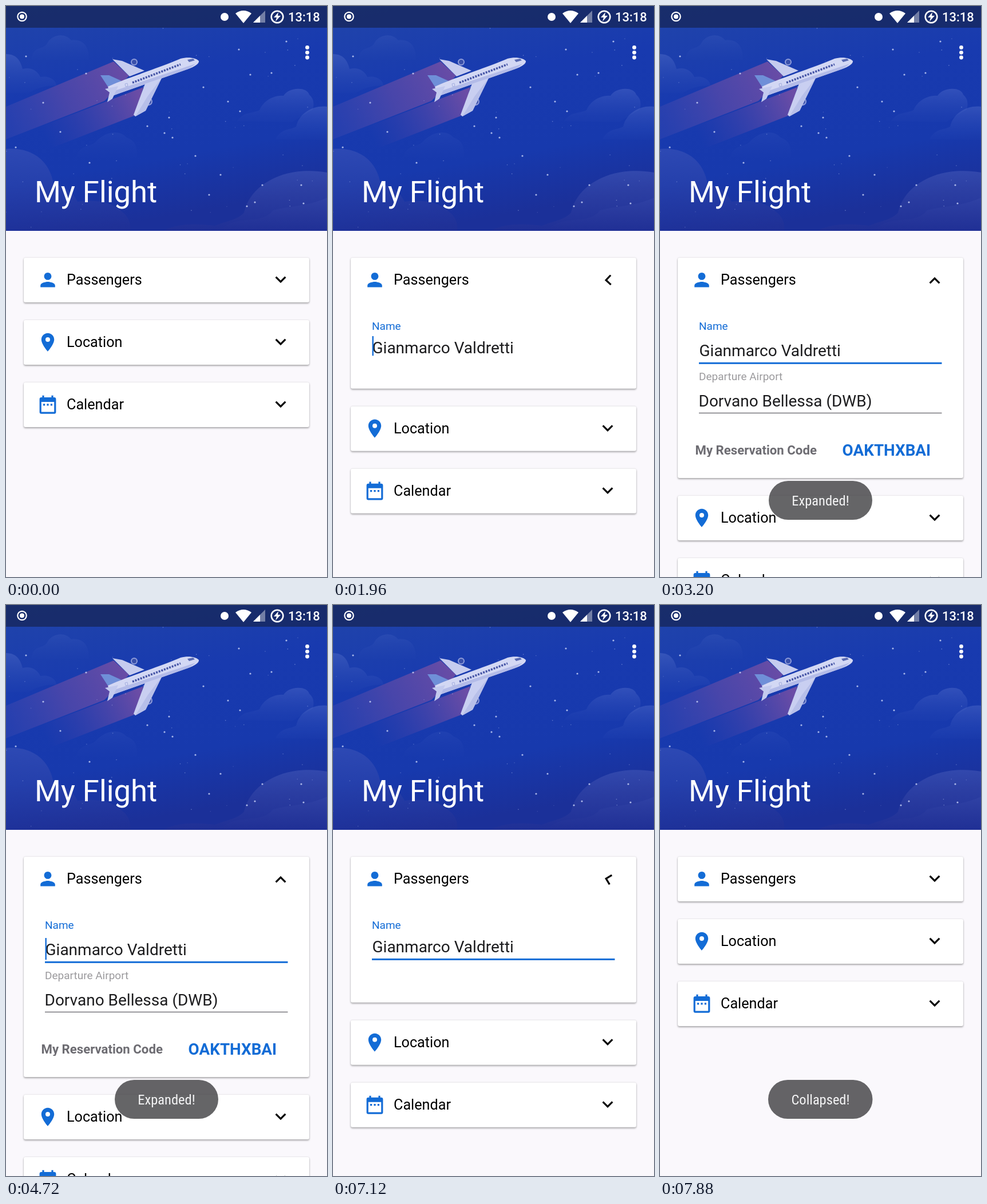
An HTML page that plays this animation: 561 px wide and 998 px high, repeating every 9.36 s.

```html
<!DOCTYPE html>
<html lang="en">
<head>
<meta charset="utf-8">
<title>My Flight</title>
<style>
  html, body { margin: 0; height: 100%; overflow: hidden; background: #faf8fc; }
  svg { display: block; width: 561px; height: 998px; font-family: Roboto, sans-serif; }
  .card { fill: #fff; filter: drop-shadow(0 2px 1.5px rgba(0,0,0,.27)) drop-shadow(0 0 1px rgba(0,0,0,.16)); }
  .head { font-size: 25.2px; }
  .label { font-size: 19px; }
  .value { font-size: 28px; fill: #1c1c1e; }
  .blue { fill: #136cd6; }
  #toast text { font-size: 24.5px; font-stretch: condensed; font-family: "Roboto Condensed", Roboto, sans-serif; }
</style>
</head>
<body>
<svg viewBox="0 0 561 998">
  <defs>
    <linearGradient id="sky" x2=".25" y2="1">
      <stop stop-color="#2145aa"/><stop offset=".4" stop-color="#183aaf"/>
      <stop offset=".75" stop-color="#1739ad"/><stop offset="1" stop-color="#1b3099"/>
    </linearGradient>
    <linearGradient id="trail" gradientUnits="userSpaceOnUse" x1="215" y1="125" x2="0" y2="215">
      <stop stop-color="#a3599f" stop-opacity=".58"/><stop offset=".5" stop-color="#8053a4" stop-opacity=".46"/>
      <stop offset="1" stop-color="#5b55b0" stop-opacity=".2"/>
    </linearGradient>
    <linearGradient id="trailEnd" gradientUnits="userSpaceOnUse" x1="240" y1="170" x2="75" y2="245">
      <stop stop-color="#a3599f" stop-opacity=".6"/><stop offset="1" stop-color="#5b4aa8" stop-opacity="0"/>
    </linearGradient>
    <linearGradient id="cloud" x2="0" y2="1">
      <stop stop-color="#6f86d8" stop-opacity=".3"/><stop offset="1" stop-color="#4560c0" stop-opacity=".04"/>
    </linearGradient>
    <linearGradient id="bigCloud" x2="0" y2="1">
      <stop stop-color="#5062bd" stop-opacity=".45"/><stop offset="1" stop-color="#252f91" stop-opacity=".4"/>
    </linearGradient>
    <clipPath id="top"><rect width="561" height="393"/></clipPath>
    <clipPath id="body"><rect id="bodyClip" x="31" y="519" width="499"/></clipPath>
  </defs>
  <rect width="561" height="998" fill="#faf8fc"/>

  <g clip-path="url(#top)">
    <rect width="561" height="393" fill="url(#sky)"/>
    <g fill="url(#cloud)">
      <path d="M0 84C20 84 26 98 29 110C46 106 56 115 60 124C76 121 88 130 88 139Q60 139 40 152H0Z"/>
      <path opacity=".45" d="M45 91C48 70 62 77 71 67C80 48 104 47 114 60C136 57 145 72 145 94H45Z"/>
      <path opacity=".3" d="M123 264C128 242 147 247 156 238C176 217 199 217 211 230C230 236 230 254 229 266Z"/>
      <path d="M404 201C415 184 432 188 443 182C453 160 475 156 485 157C493 142 526 140 530 155Q541 164 536 181L500 203Z"/>
      <path d="M471 233C481 213 497 217 507 211C512 188 536 173 561 176V234Z"/>
    </g>
    <g fill="url(#bigCloud)">
      <path opacity=".85" d="M0 250C48 246 77 273 83 311C103 316 117 325 125 342C154 338 184 342 202 359Q219 371 217 393H0Z"/>
      <path d="M275 393C301 379 334 380 365 384C388 375 406 373 416 361C427 311 489 278 561 291V393Z"/>
      <path opacity=".35" d="M372 393C407 361 443 386 467 357C495 349 526 351 561 335V393Z"/>
    </g>
    <path d="M188 97L0 176V233L172 166L215 122Z" fill="url(#trail)"/>
    <path d="M240 142L42 218L75 250L226 191Z" fill="url(#trailEnd)"/>
    <g id="stars" fill="#d9e2ff"></g>

    <g id="plane">
      <g fill="#3a50aa" stroke="#8f9cda" stroke-width="2">
        <circle cx="224" cy="98" r="5"/><circle cx="249" cy="167" r="6"/>
      </g>
      <path d="M186 93L203 96L242 113L216 123Z" fill="#c6ccef"/>
      <path d="M165 121L180 121L202 131L178 141Z" fill="#6f8fd8"/>
      <path d="M178 141C204 128 271 107 305 92C319 88 333 91 337 96C338 102 326 108 313 112L197 153L186 157L181 151Z" fill="#d3d8f4"/>
      <path d="M181 151L331 101C326 106 320 109 313 112L197 153L186 157Z" fill="#b3bbe8"/>
      <path d="M173 145L196 140L186 162L177 168L181 151Z" fill="#c3caee"/>
      <path d="M243 136L272 126L244 183L226 193L223 190Z" fill="#c9cff1"/>
      <path d="M272 126L244 183L226 193L248 157Z" fill="#b7bfe9"/>
      <path d="M221 134L305 102" fill="none" stroke="#4655a6" stroke-width="3.6" stroke-dasharray="3 1.9"/>
      <path d="M317 94L327 92L330 95L320 98Z" fill="#5869b2"/>
      <path d="M208 136l4-1 1 5-4 1Z" fill="none" stroke="#a5afe0"/>
    </g>
    <rect width="561" height="38" fill="#15224f" opacity=".68"/>
  </g>

  <g fill="#fff">
    <circle cx="28" cy="18.5" r="7.7" fill="none" stroke="#fff" stroke-width="2.2"/>
    <circle cx="28" cy="18.5" r="4"/>
    <circle cx="382" cy="19" r="7"/>
    <path d="M401 13Q415 3 429 13L415 30Z"/>
    <path d="M453 8V29H432Z" opacity=".4"/><path d="M444 17V29H432Z"/>
    <circle cx="474" cy="19" r="10.3" fill="none" stroke="#fff" stroke-width="2.6"/>
    <path d="M476 11L468 20H473L471 27L480 17H475Z"/>
    <text x="493" y="27" font-size="22" font-weight="500">13:18</text>
    <circle cx="526.5" cy="72.5" r="3.4"/><circle cx="526.5" cy="81.3" r="3.4"/><circle cx="526.5" cy="90" r="3.4"/>
    <text x="50" y="343" font-size="52.6">My Flight</text>
  </g>

  <g id="cards"></g>

  <g clip-path="url(#body)">
    <text class="label blue" x="68" y="566">Name</text>
    <g id="name">
      <text class="value" x="68.5" y="612">Gianmarco Valdretti</text>
      <rect class="blue" x="68" y="622.8" width="424.5" height="3"/>
      <rect class="blue" id="cursor" x="68.5" y="582" width="2.4" height="38"/>
    </g>
    <text class="label" x="68" y="654" fill="#9b9a9d">Departure Airport</text>
    <text class="value" x="67.5" y="700">Dorvano Bellessa (DWB)</text>
    <rect x="68" y="710.7" width="424.5" height="1.5" fill="#77767c"/>
    <g id="code" font-weight="700">
      <text x="61.5" y="783.5" font-size="22.2" fill="#6d6c72">My Reservation Code</text>
      <text class="blue" x="318.6" y="786.3" font-size="27.8">OAKTHXBAI</text>
    </g>
  </g>

  <g id="toast">
    <rect id="pill" y="830" height="68" rx="34" fill="#323234" opacity=".75"/>
    <text x="280.5" y="873" text-anchor="middle" fill="#f4f4f5"></text>
  </g>
</svg>
<script>
const $ = id => document.getElementById(id);
const clamp = x => Math.min(1, Math.max(0, x));
const LOOP = 9360, FULL = 307, GAP = 109;
const EXPAND = 1788, COLLAPSE = 6963, MOVE = 350, FADE = 500;

const icons = [
  ["Passengers", "M12 12c2.21 0 4-1.79 4-4s-1.79-4-4-4-4 1.79-4 4 1.79 4 4 4zm0 2c-2.67 0-8 1.34-8 4v2h16v-2c0-2.66-5.33-4-8-4z"],
  ["Location", "M12 2C8.13 2 5 5.13 5 9c0 5.25 7 13 7 13s7-7.75 7-13c0-3.87-3.13-7-7-7zm0 9.5a2.5 2.5 0 0 1 0-5 2.5 2.5 0 0 1 0 5z"],
  ["Calendar", "M9 11H7v2h2zm4 0h-2v2h2zm4 0h-2v2h2zm2-7h-1V2h-2v2H8V2H6v2H5a2 2 0 0 0-2 2v14a2 2 0 0 0 2 2h14a2 2 0 0 0 2-2V6a2 2 0 0 0-2-2zm0 16H5V9h14z"]
];
$("cards").innerHTML = icons.map(([title, path]) => `
  <g>
    <rect class="card" x="31" width="499" height="78" rx="3"/>
    <path class="blue" transform="translate(73 38.8) scale(1.6) translate(-12 -12)" d="${path}"/>
    <text class="head" x="106" y="47">${title}</text>
    <g class="arrow" transform="translate(480 39)"><path transform="scale(1.58) translate(-12 -12)"
      d="M7.41 7.84L12 12.42l4.59-4.58L18 9.25l-6 6-6-6z"/></g>
  </g>`).join("");
const cards = [...$("cards").children];
const firstRect = cards[0].querySelector("rect");
const firstArrow = cards[0].querySelector(".arrow");

// Bright stars, then seeded faint ones
const bright = [345,142, 407,76, 427,120, 388,167, 375,295, 331,262, 464,117, 409,184, 146,274,
  65,169, 285,195, 277,222, 140,118, 95,220, 17,247, 448,313, 435,343, 520,345, 516,313, 490,62,
  247,210, 35,88, 355,330, 421,350, 291,230];
let seed = 7;
const random = () => (seed = seed * 16807 % 2147483647) / 2147483647;
const star = (x, y, r, o) => `<circle cx="${x}" cy="${y}" r="${r}" opacity="${o}"/>`;
let sky = "";
for (let i = 0; i < bright.length; i += 2) sky += star(bright[i], bright[i + 1], 1.6, .75);
for (let i = 0; i < 50; i++) sky += star(random() * 561, 38 + random() * 350, .8, .15 + random() * .3);
$("stars").innerHTML = sky;

const ease = x => (1 - Math.cos(Math.PI * clamp(x))) / 2;
const fadeIn = x => 1 - (1 - clamp(x)) ** 2;
const fadeOut = x => 1 - clamp(x) ** 2;
const moveY = (node, y) => node.setAttribute("transform", `translate(0 ${y})`);

function draw(t) {
  const open = ease((t - EXPAND) / MOVE) - ease((t - COLLAPSE) / MOVE);
  const grow = FULL * open;

  firstRect.setAttribute("height", 78 + grow);
  firstArrow.setAttribute("transform", `translate(480 39) rotate(${180 * open})`);
  cards.forEach((card, i) => moveY(card, 440 + GAP * i + (i ? grow : 0)));

  // Rows are squeezed while the card has no room for them
  $("bodyClip").setAttribute("height", Math.max(0, grow - 65 + 27 * open * open));
  moveY($("name"), -5 * clamp((1 - open) / .427));
  moveY($("code"), -75 * (1 - open));
  const blinkOn = t < 2169 || Math.floor((t - 2672) / 503) % 2 === 0;
  $("cursor").setAttribute("opacity", blinkOn && t < COLLAPSE ? 1 : 0);

  const closing = t > COLLAPSE;
  const alpha = closing ? fadeIn((t - 7345) / FADE)
    : fadeIn((t - 2165) / FADE) * fadeOut((t - 6170) / FADE);
  $("toast").setAttribute("opacity", alpha);
  $("toast").lastElementChild.textContent = closing ? "Collapsed!" : "Expanded!";
  $("pill").setAttribute("x", closing ? 189 : 190);
  $("pill").setAttribute("width", closing ? 182.5 : 181);
}

function tick() {
  draw(performance.now() % LOOP);
  requestAnimationFrame(tick);
}
tick();
</script>
</body>
</html>
```
